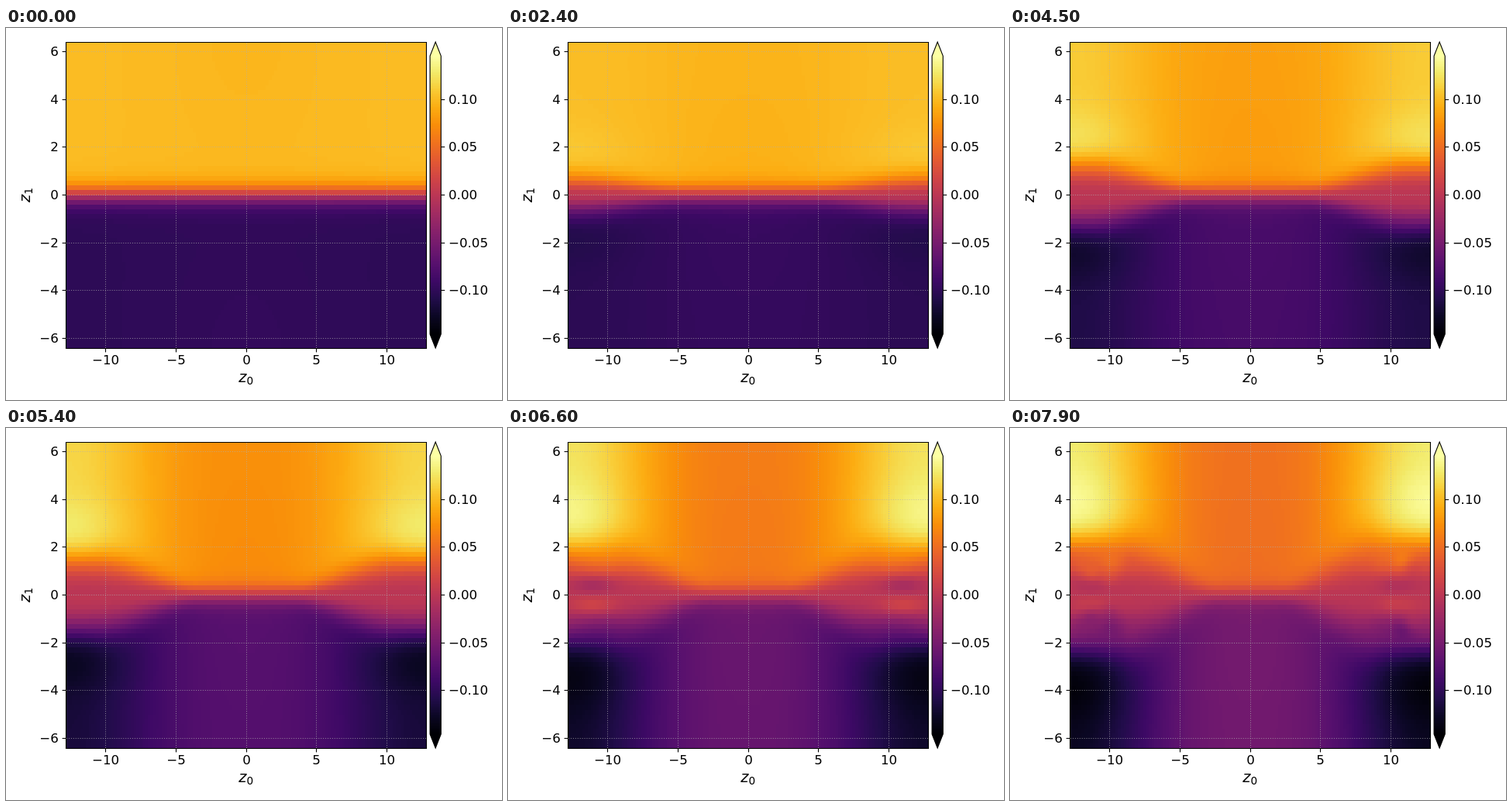
Write an HTML page with a canvas that moves like this. It is 640x480 px and loops after 8 s.

```html
<!DOCTYPE html>
<html lang="en">
<head>
<meta charset="utf-8">
<title>Field map</title>
<style>
  html, body { margin: 0; width: 100%; height: 100%; overflow: hidden; background: #fff; }
  canvas, svg { position: absolute; left: 0; top: 0; width: 640px; height: 480px; }
  text { font: 16.67px "DejaVu Sans", sans-serif; fill: #000; }
  .axis { font-size: 19.4px; }
  .axis .var { font-style: italic; }
  .axis .sub { font-size: 13.6px; }
  .line { fill: none; stroke: #000; stroke-width: 1.11; }
  .grid { fill: none; stroke: #b0b0b0; stroke-width: 0.8; stroke-dasharray: 1.1 1.83; opacity: 0.85; }
</style>
</head>
<body>
<canvas id="stage" width="640" height="480"></canvas>
<svg id="frame" viewBox="0 0 640 480"></svg>
<script>
const LOOP = 8000, STEP = 100;
const COLS = 128, ROWS = 64, CELL = 0.2;
const BOX = { x: 77.5, y: 18, w: 465, h: 395 };
const MID = { x: BOX.x + BOX.w / 2, y: BOX.y + BOX.h / 2 };
const BAR = { l: 547.1, r: 561.3, top: 36, bottom: 395 };
const VMAX = 0.1457;

// Colour map: 256 levels between evenly spaced stops
const STOPS = ("000004 0b0724 210c4a 3d0965 57106e 71196e 8a226a a32c61 bc3754 " +
  "d24644 e45a31 f1731d f98e09 fcac11 f9cb35 f2ea69 fcffa4").split(" ")
  .map(h => [0, 2, 4].map(i => parseInt(h.slice(i, i + 2), 16)));
const PALETTE = Array.from({ length: 256 }, (_, i) => {
  const k = i >> 4, f = k === 15 ? (i - 240) / 15 : i / 16 - k;
  return STOPS[k].map((c, j) => Math.round(c + (STOPS[k + 1][j] - c) * f));
});
const level = v => Math.max(0, Math.min(255, Math.floor((v / VMAX + 1) * 128)));

const bell = u => Math.exp(-u * u);
const mix = (a, b, f) => a + (b - a) * f;
const smooth = (a, b, x) => {
  const u = Math.max(0, Math.min(1, (x - a) / (b - a)));
  return u * u * (3 - 2 * u);
};

let seed = 7;
const random = () => (seed = seed * 16807 % 2147483647) / 2147483647;
const plumes = Array.from({ length: 12 }, (_, i) => ({
  x: (i % 2 ? 1 : -1) * mix(8.5, 12.6, random()),
  y: mix(0.2, 1.6, random()),
  strength: mix(-0.014, 0.018, random())
}));

// Shape of the field after s seconds
function stateAt(s) {
  const q = 1 / (1 + Math.exp((5.4 - s) / 1.1));
  const width = 0.5 + 0.29 * Math.max(0, s - 1);
  return {
    width,
    steep: 1 + 1.15 * (width - 0.5),
    centre: 0.0995 - 0.05 * q,
    edge: 0.1005 + 0.031 * q,
    bump: 0.013 * smooth(0.5, 4.5, s),
    bumpY: 1.5 + 2.7 * q,
    from: 5 - 3 * q,
    to: 12.5 - 4 * q,
    dipY: Math.max(1.5, 6 - 3.2 * s),
    swirl: smooth(5.2, 7, s),
    chaos: smooth(7, 7.9, s)
  };
}

// Value in the upper half; the lower half is its negative
function field(x, y, m) {
  const ax = Math.abs(x);
  const side = Math.sin(Math.PI * ax / 25.6) ** 3.2;
  const width = mix(0.5, m.width, smooth(m.from, m.to, ax));
  const amp = mix(m.centre, m.edge, side)
    + m.bump * side * side * bell((y - m.bumpY) / 1.3)
    - 0.0018 * bell(x / 4) * bell((y - m.dipY) / 3);
  let v = amp * Math.tanh((y / width) ** mix(1, m.steep, side));
  if (m.swirl) {
    const core = bell((ax - 11) / 1.6) * bell((y - 0.45) / 0.35);
    const ring = bell((ax - 10.5) / 3) * bell((y - 1.3) / 0.6);
    v += m.swirl * (0.023 * ring - 0.022 * core * (1 - m.chaos / 2));
  }
  if (m.chaos) {
    for (const p of plumes) {
      v += m.chaos * p.strength * bell((x - p.x) / 0.7) * bell((y - p.y) / 0.35);
    }
  }
  return v;
}

const ctx = document.getElementById("stage").getContext("2d");
const map = document.createElement("canvas");
map.width = COLS;
map.height = ROWS;
const mapCtx = map.getContext("2d");
const pixels = mapCtx.createImageData(COLS, ROWS);

function plot(col, row, v) {
  const o = (row * COLS + col) * 4;
  pixels.data.set(PALETTE[level(v)], o);
  pixels.data[o + 3] = 255;
}

function drawField(t) {
  const state = stateAt(t / 1000);
  for (let r = 0; r < ROWS / 2; r++) {
    for (let c = 0; c < COLS; c++) {
      const v = field((c - COLS / 2 + 0.5) * CELL, (r + 0.5) * CELL, state);
      plot(c, ROWS / 2 - 1 - r, v);
      plot(c, ROWS / 2 + r, -v);
    }
  }
  mapCtx.putImageData(pixels, 0, 0);
  ctx.imageSmoothingEnabled = false;
  ctx.drawImage(map, BOX.x, BOX.y, BOX.w, BOX.h);
}

function drawBar() {
  const { l, r, top, bottom } = BAR;
  const tip = (y, base, color) => {
    ctx.fillStyle = color;
    ctx.beginPath();
    ctx.moveTo(l, base);
    ctx.lineTo((l + r) / 2, y);
    ctx.lineTo(r, base);
    ctx.fill();
  };
  for (let y = top; y < bottom; y++) {
    const v = VMAX * (1 - 2 * (y + 0.5 - top) / (bottom - top));
    ctx.fillStyle = `rgb(${PALETTE[level(v)]})`;
    ctx.fillRect(l, y, r - l, 1);
  }
  tip(BOX.y, top, "#fcffa4");
  tip(BOX.y + BOX.h, bottom, "#000004");
}

function buildFrame() {
  const out = [];
  const snap = v => Math.floor(v) + 0.5;
  const path = (cls, d) => out.push(`<path class="${cls}" d="${d}"/>`);
  const text = (x, y, s, anchor) =>
    out.push(`<text x="${x}" y="${y}" text-anchor="${anchor}">${s}</text>`);
  const num = (v, digits) => (v < 0 ? "\u2212" : "") + Math.abs(v).toFixed(digits);
  const label = (n, place) => out.push(`<text class="axis" transform="${place}">` +
    `<tspan class="var">z</tspan><tspan class="sub" dy="3.1">${n}</tspan></text>`);

  for (let v = -10; v <= 10; v += 5) {
    const x = snap(MID.x + v * BOX.w / 25.6);
    path("grid", `M${x} 413V18`);
    path("line", `M${x} 413.5v4.9`);
    text(x, 434, num(v, 0), "middle");
  }
  for (let v = -6; v <= 6; v += 2) {
    const y = snap(MID.y - v * BOX.h / 12.8);
    path("grid", `M78 ${y}H542`);
    path("line", `M77.5 ${y}h-4.9`);
    text(67.8, y + 5.5, num(v, 0), "end");
  }
  for (let i = -2; i <= 2; i++) {
    const v = i * 0.05;
    const y = snap(MID.y - v / VMAX * (BAR.bottom - BAR.top) / 2);
    path("line", `M${BAR.r} ${y}h4.9`);
    text(571, y + 5.5, num(v, 2), "start");
  }
  path("line", "M77.5 18.5H542.5V413.5H77.5Z");
  const m = (BAR.l + BAR.r) / 2;
  path("line", `M${BAR.l} ${BAR.bottom}L${m} ${BOX.y + BOX.h}L${BAR.r} ${BAR.bottom}` +
    `V${BAR.top}L${m} ${BOX.y}L${BAR.l} ${BAR.top}Z`);
  label(0, "translate(300.3 457)");
  label(1, "translate(30.5 225) rotate(-90)");
  document.getElementById("frame").innerHTML = out.join("");
}

buildFrame();
drawBar();

const start = performance.now();
let shown = -1;
function tick() {
  const t = Math.floor(((performance.now() - start) % LOOP) / STEP) * STEP;
  if (t !== shown) drawField(shown = t);
  requestAnimationFrame(tick);
}
tick();
</script>
</body>
</html>
```
